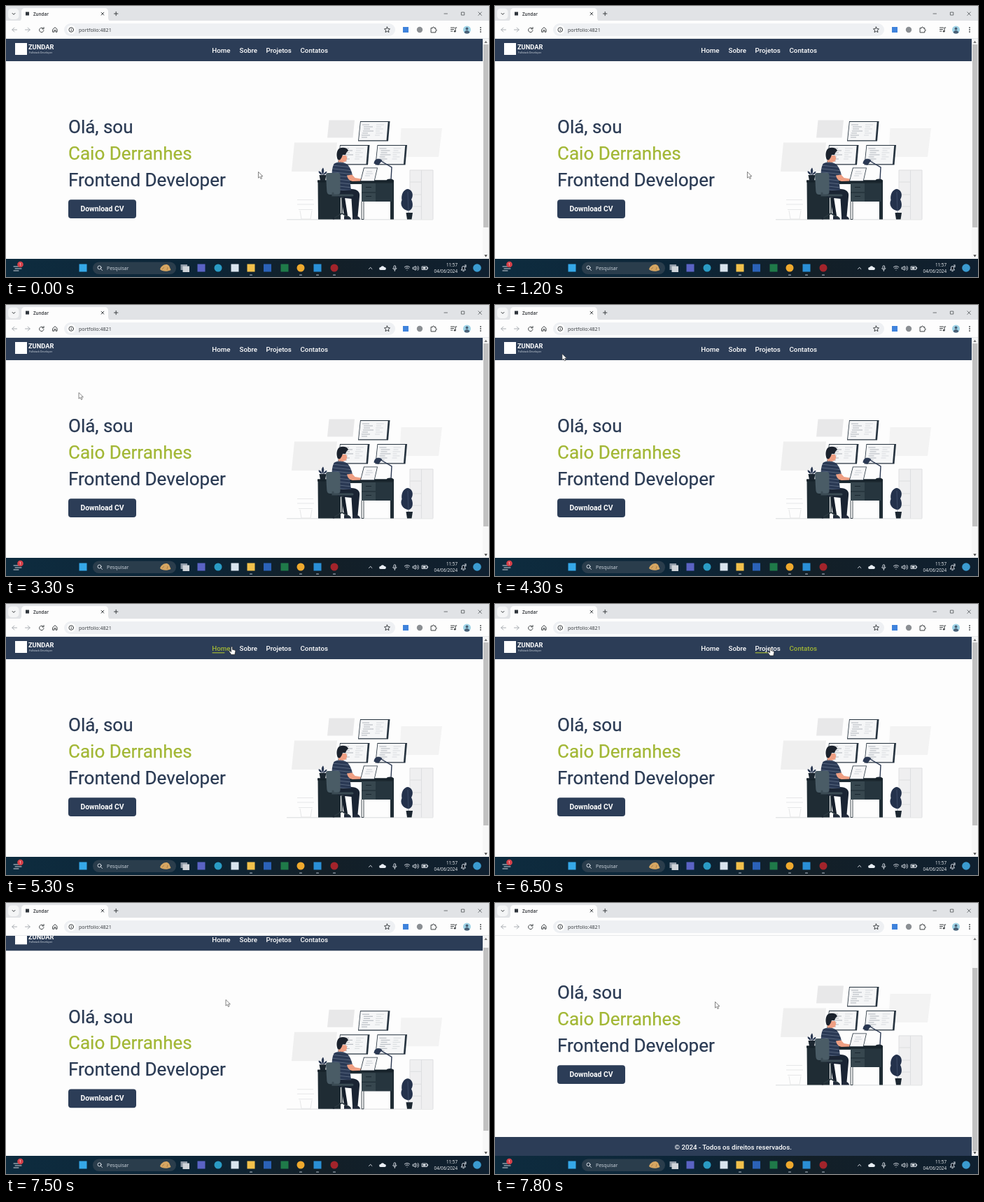
These frames come from a looping animation (690 px wide and 388 px high, 8 s). An HTML page:

```html
<!DOCTYPE html>
<html lang="pt-BR">
<head>
<meta charset="utf-8">
<title>Zundar</title>
<style>
  html, body { margin: 0; width: 100%; height: 100%; overflow: hidden; background: #fdfdfd; }
  svg { display: block; }
  .ui { font-family: "Open Sans", "Noto Sans", sans-serif; }
  .web { font-family: Roboto, sans-serif; }
  .line { fill: none; stroke: #3c4043; stroke-width: 1; stroke-linecap: round; stroke-linejoin: round; }
  .tray { fill: none; stroke: #e8edf3; stroke-width: .9; stroke-linecap: round; stroke-linejoin: round; }
</style>
</head>
<body>
<svg width="690" height="388" viewBox="0 0 690 388">
  <defs>
    <clipPath id="view"><rect y="47" width="681" height="315"/></clipPath>
    <linearGradient id="bar">
      <stop offset="0" stop-color="#0e2c3f"/>
      <stop offset=".4" stop-color="#0c2537"/>
      <stop offset=".65" stop-color="#131f27"/>
      <stop offset="1" stop-color="#0f2030"/>
    </linearGradient>
    <pattern id="stripes" width="8" height="4.8" patternUnits="userSpaceOnUse" patternTransform="rotate(6)">
      <rect width="8" height="4.8" fill="#2a3954"/>
      <rect width="8" height=".7" fill="#68768d"/>
    </pattern>
    <g id="screen">
      <path d="M3 0H45.500L43 28.500H0Z" fill="#26333f"/>
      <path d="M3.700 .9H42.700L40.500 27.300H1Z" fill="#f5f6f7"/>
      <path d="M6 5h10M8 8h13M8 11h9M7 14h15M6 17h8M5 20h12M5 23h8" stroke="#9199a2" stroke-width=".7"/>
      <path d="M26 5h11M26 8h7M25 11h11M25 14h6M25 17h10M24 20h7" stroke="#c9ced3" stroke-width=".7"/>
    </g>
  </defs>

  <rect width="690" height="388" fill="#fdfdfd"/>

  <g clip-path="url(#view)">
    <g id="page">
      <rect y="47" width="681" height="32" fill="#2c3d57"/>
      <rect x="13" y="53" width="17" height="17" fill="#fff"/>
      <g class="web" fill="#fff">
        <text x="32" y="62.300" font-size="9.250" font-weight="700">ZUNDAR</text>
        <text x="33" y="68" font-size="3.800" fill="#c9d0da">Fullstack Developer</text>
      </g>
      <g id="nav" class="web" font-size="9.750" font-weight="500"></g>

      <g class="web" font-size="26" fill="#2a3a53" stroke="#2a3a53" stroke-width=".25">
        <text x="89" y="182.300">Olá, sou</text>
        <text x="89" y="220" fill="#a2b735" stroke="#a2b735">Caio Derranhes</text>
        <text x="89" y="257.800">Frontend Developer</text>
      </g>
      <rect x="89" y="277.300" width="97" height="26.700" rx="4" fill="#2c3d57"/>
      <text class="web" x="106.500" y="294.100" font-size="10.350" font-weight="700" fill="#fff">Download CV</text>

      <g id="scene">
        <path d="M461.500 163.500H498L495.500 188.500H459Z" fill="#e8e8e9"/>
        <path d="M564.500 175H623L618 216H562Z" fill="#f3f3f3"/>
        <path d="M412 195.500H473L469 237H408Z" fill="#efefef"/>
        <path d="M401 305.800H610" stroke="#cfd2d4" stroke-width=".8"/>
        <!-- shelf -->
        <path d="M577 235H610V305.500H577Z" fill="#efeff0"/>
        <path d="M577 235V305.500M593.500 235V305.500M610 235V305.500M577 235H610M577 252H593M577 270H593M577 287H593" stroke="#dddee0" fill="none"/>
        <!-- pale shelf and pot -->
        <path d="M416 277.500H439M416 284H440M418 291.500H438M420 293l2 12h13l2-12" fill="none" stroke="#e6e7e8"/>
        <!-- screens -->
        <use href="#screen" x="503" y="165"/>
        <use href="#screen" x="474" y="199"/>
        <use href="#screen" x="527.500" y="199"/>
        <!-- desk -->
        <path d="M445.500 249.500H554V305.500H549V280H508V255H478V305.500H446Z" fill="#1f2c34"/>
        <path d="M508 254H528V280H508Z" fill="#37474f"/>
        <path d="M528 254H552V280H528Z" fill="#26353e"/>
        <path d="M508 280V305.500H511V280M508 267H528M514 259.500h8M514 272.500h8" stroke="#15212a" stroke-width=".8" fill="none"/>
        <path d="M445 249.500H554V252.500H445Z" fill="#16222a"/>
        <!-- small plant -->
        <path d="M447.500 242H457.500L456 250H449Z" fill="#1b2630"/>
        <path d="M452.500 242C450.500 238 450 234 453 231.500C455 235 454.500 239 452.500 242ZM451.500 242C448 241 446.500 239 446.500 236.500C449.500 236.500 451.500 239 451.500 242ZM453 242C454 239 456 237 458.500 237C458.500 239 456.500 241.500 453 242Z" fill="#2a3852"/>
        <!-- lamp -->
        <path d="M550 249L551 231L534 221" fill="none" stroke="#2a3852" stroke-width="1.400"/>
        <path d="M525.500 225.500C526 219 532 216.500 537.500 221L532 228Z" fill="#2a3852"/>
        <path d="M543.500 250C544 246.800 553 246.800 553.500 250Z" fill="#1b2630"/>
        <!-- worker -->
        <path d="M472 262H493C502 262 506 266 505 273L502.500 301H495L493.500 276L474 274Z" fill="#1a2433"/>
        <path d="M484 274L488 300H483L479 275Z" fill="#151e2b"/>
        <path d="M495 300.500H501C504.500 301.500 506 303.500 506 305.500H495ZM483 300.500H488.500C491.500 302 493 304 493 305.500H483Z" fill="#20293a"/>
        <path d="M475 214H486L487.300 218.500L485.500 222.500L482 223.500L482.500 227L475 226.500Z" fill="#ee9f83"/>
        <path d="M474 220C471.500 215 472 207 476 204C481 201.500 487.500 203 489 207L486.500 209.500L485 213H481L479.500 217L477 220.500Z" fill="#1b222d"/>
        <path d="M468.500 226C474 222.500 481 223 485.500 225.500C491 228.500 493.500 236 495 242L491 247L493 264H469C465 253 464 234 468.500 226Z" fill="url(#stripes)"/>
        <path d="M487 242.500L494.500 241.500L498.500 246L510.500 248L511.500 250.500L495 251C490 250 488 247 487 242.500Z" fill="#ee9f83"/>
        <!-- laptop -->
        <path d="M511 231.500H531L526.500 251H506Z" fill="#26333f"/>
        <path d="M511.700 232.300H530L525.900 250.200H507Z" fill="#f7f7f8"/>
        <path d="M515 237h8M514 240h10M513 243h7" stroke="#b9c0c7" stroke-width=".7"/>
        <!-- chair -->
        <path d="M460 239H474C477 239 477.500 241 477.500 243V266C477.500 269 476 270 473 270H463C460 270 458.500 268 458.300 265L457 242C457 240 458 239 460 239Z" fill="#4a5c66"/>
        <path d="M467 268V271H495" stroke="#3b4b54" stroke-width="3" fill="none" stroke-linecap="round"/>
        <path d="M480 272V298M468 304L480 297L492 304" stroke="#2a373f" stroke-width="1.600" fill="none"/>
        <circle cx="468" cy="304" r="1.500" fill="#1b2630"/>
        <!-- floor plant -->
        <path d="M573.500 293C566 291 562.500 284 565.500 278C564 270 568 262 574.500 262C581 264 582.500 271 579 277C582.500 284 581 291 576 293Z" fill="#24324c"/>
        <path d="M574 266L575 296" stroke="#4d5d79" stroke-width=".6"/>
        <path d="M571.500 296H581L579.500 305.500H573Z" fill="#1b2630"/>
      </g>

      <rect y="380" width="681" height="28" fill="#2c3d57"/>
      <text class="web" x="256.500" y="397.500" font-size="9.700" font-weight="500" fill="#fff">© 2024 - Todos os direitos reservados.</text>
    </g>
  </g>

  <!-- scrollbar -->
  <rect x="681" y="47" width="9" height="315" fill="#f7f7f7"/>
  <path d="M683.300 53L685.500 49.800L687.700 53Z" fill="#777"/>
  <path d="M683.300 356.300L685.500 359.500L687.700 356.300Z" fill="#444"/>
  <rect id="thumb" x="682" y="55" width="7.200" height="262" fill="#c1c1c1"/>

  <!-- browser frame -->
  <g class="ui">
    <rect width="690" height="22" fill="#e1e3e6"/>
    <rect y="21" width="690" height="26" fill="#fdfdfd"/>
    <path d="M17 22C20 22 22 20 22 17V8C22 5 24 3 27 3H141C144 3 146 5 146 8V17C146 20 148 22 151 22Z" fill="#fdfdfd"/>
    <rect x="3" y="3.500" width="15.500" height="15.500" rx="5" fill="#f4f5f6"/>
    <path class="line" d="M9 10.300l2 2l2-2M136 9.200l3.800 3.800m0-3.800l-3.800 3.800M154.500 11h5.400m-2.700-2.700v5.400"/>
    <rect x="28" y="8.500" width="5" height="5" fill="#30363d"/>
    <text x="39" y="13.600" font-size="6.300" font-weight="600" fill="#2b2e33">Zundar</text>
    <path class="line" style="stroke-width:.7" d="M626 11h4.500M650.800 9h4v4h-4zM674.800 8.800l4.600 4.600m0-4.600l-4.600 4.600"/>
    <path class="line" style="stroke:#a9adb2" d="M15.500 34H8.800m3-3l-3 3l3 3M27.500 34h6.700m-3-3l3 3l-3 3"/>
    <path class="line" d="M53.300 32.300A3.200 3.200 0 1 0 54 35M54 30.500v2.400h-2.400M67 33.300l3-2.700l3 2.700v3.900h-2v-2.500h-2v2.500h-2z"/>
    <rect x="83" y="25" width="473" height="18" rx="9" fill="#eef0f3"/>
    <circle cx="93.200" cy="34" r="6.200" fill="#fff"/>
    <circle class="line" cx="93.200" cy="34" r="3.300"/>
    <path class="line" d="M93.200 33.800v1.700M93.200 32.200v.1"/>
    <text x="104" y="36.700" font-size="7.100" fill="#33373c">portfolio:4821</text>
    <path class="line" d="M544.500 30l1.200 2.600l2.800.3l-2.100 1.900l.6 2.800l-2.500-1.400l-2.500 1.400l.6-2.800l-2.100-1.900l2.800-.3z"/>
    <rect x="567" y="30" width="8" height="8" fill="#3f83dc"/>
    <circle cx="591" cy="34" r="4.200" fill="#8b8f93"/>
    <path class="line" d="M607.500 31.500h2c-.3-2 2.400-2 2.100 0h2.200v2.200c1.900-.3 1.900 2.300 0 2v2.200h-6.300z"/>
    <path class="line" d="M635.500 31h5M635.500 33.500h4M635.500 36h2.500M642 36v-5h1.800"/>
    <circle cx="641.200" cy="36.200" r="1.300" fill="#3c4043"/>
    <circle cx="658.500" cy="34" r="5.500" fill="#9fd3e6"/>
    <path d="M654.700 38c.5-4 7-4 7.600 0c-2 2-5.600 2-7.600 0Z" fill="#4a6076"/>
    <circle cx="658.500" cy="32.500" r="1.900" fill="#4a6076"/>
    <g fill="#3c4043"><circle cx="678" cy="31" r=".9"/><circle cx="678" cy="34" r=".9"/><circle cx="678" cy="37" r=".9"/></g>
    <path d="M0 46.500H690" stroke="#e3e5e8" stroke-width=".8"/>
  </g>

  <!-- taskbar -->
  <g class="ui">
    <rect y="362" width="690" height="26" fill="url(#bar)"/>
    <path class="tray" d="M11 373h7M13 376h9M11 379h7"/>
    <circle cx="20.500" cy="370" r="4.300" fill="#d7414a"/>
    <text x="20.500" y="372.200" font-size="6" text-anchor="middle" fill="#fff">1</text>
    <rect x="124" y="366.500" width="119" height="17.500" rx="8.700" fill="#2a3d4c"/>
    <circle class="tray" cx="133.500" cy="374.500" r="2.500"/>
    <path class="tray" d="M135.500 376.500l2 2"/>
    <text x="144" y="377.700" font-size="6.900" fill="#cfd6de">Pesquisar</text>
    <path d="M220 377C221 372 229 367 233 372L235.500 378C231 380.500 223 380.500 220 377Z" fill="#d6a662"/>
    <path d="M223 377l3-3M230 378l1-4" stroke="#9c6d3a" stroke-width=".7"/>
    <path d="M249.500 370H259V378H249.500Z" fill="#8d98a5"/>
    <path d="M252.500 372.500H262V381H252.500Z" fill="#cfd4d9"/>
    <g id="apps"></g>
    <path class="tray" d="M518.500 376.500l2.200-2.200l2.200 2.200"/>
    <path d="M535 378a2 2 0 0 1 .2-4a3 3 0 0 1 5.400 0a2 2 0 0 1 .6 4Z" fill="#e8edf3"/>
    <path class="tray" d="M554 373a1.300 1.300 0 0 1 2.600 0v2a1.300 1.300 0 0 1-2.600 0zM552.700 375.500c.5 2.800 4.700 2.800 5.200 0M555.300 378v1.500"/>
    <path class="tray" d="M569.300 374c2-2 5.500-2 7.500 0M570.800 375.800c1.300-1.200 3.200-1.200 4.500 0M572.900 378h.2"/>
    <path class="tray" d="M581.500 374.200h1.500l2-1.800v6l-2-1.800h-1.500zM586.700 373.700c1 1 1 2.400 0 3.400M588.200 372.300c1.800 1.700 1.800 4.500 0 6.200"/>
    <path class="tray" d="M594.500 373h7v4.500h-7zM602.700 374.500v1.500"/>
    <path d="M595.500 374h4v2.500h-4z" fill="#e8edf3"/>
    <g font-size="6.300" text-anchor="end" fill="#f2f4f7">
      <text x="645" y="372.500">11:57</text>
      <text x="645" y="381.700">04/06/2024</text>
    </g>
    <path class="tray" d="M650.500 378h6l-1-1.500v-2a2 2 0 0 0-4 0v2zM652.800 379.700h1.400M655.500 371h2l-2 2.300h2"/>
    <circle cx="673" cy="375" r="5.800" fill="#3b9bd0"/>
  </g>

  <path id="arrow" d="M0 0V8.700L2 6.900L3.500 10L5 9.300L3.600 6.300H6.400Z" fill="#fff" stroke="#444" stroke-width=".65"/>
  <path id="hand" d="M-.9 0C-.9-1.200 1-1.200 1 0V3.200L3.600 3.800C5.200 4.200 5.500 5 5.200 6.500L4.300 10.500H-.6L-3.600 6.300C-4 5.300-2.900 4.700-2.200 5.400L-.9 6.600Z" fill="#fff" stroke="#222" stroke-width=".7"/>
</svg>
<script>
const LOOP = 8000, STEP = 100;
const NS = "http://www.w3.org/2000/svg";
const $ = id => document.getElementById(id);

function add(parent, tag, attrs, text = "") {
  const el = document.createElementNS(NS, tag);
  for (const k in attrs) el.setAttribute(k, attrs[k]);
  el.textContent = text;
  return parent.appendChild(el);
}

// taskbar apps: centre, colour, round, open
[
  [110, "#35a8e8"], [279, "#5a63c4"], [303, "#2a9bc4", 1], [327, "#d9e4ee"],
  [350, "#f2c14b", 0, 1], [373.5, "#2b62b8"], [398, "#1f7a49"],
  [421, "#efa92e", 1, 1], [445, "#2a8fd6", 0, 1], [469, "#a3242b", 1, 1]
].forEach(([x, fill, round, open]) => {
  add($("apps"), "rect", { x: x - 5.5, y: 369.5, width: 11, height: 11, rx: round ? 5.5 : 0, fill });
  if (open) add($("apps"), "rect", { x: x - 2, y: 384.5, width: 4, height: 1.3, rx: .6, fill: "#9aa5b1" });
});

// menu items with the spans during which the pointer is over them
const menu = [
  { label: "Home", x: 294.3, w: 26.5, spans: [[5100, 5400]] },
  { label: "Sobre", x: 333.5, w: 25, spans: [[5400, 5620], [6680, 6780]] },
  { label: "Projetos", x: 371.5, w: 36, spans: [[5640, 5900], [6320, 6660]] },
  { label: "Contatos", x: 420.5, w: 39, spans: [[5920, 6320]] }
];
for (const m of menu) {
  m.text = add($("nav"), "text", { x: m.x, y: 66.5 }, m.label);
  m.line = add($("nav"), "rect", { x: m.x + .3, y: 69.2, height: 1.2, fill: "#a2b735" });
}
const links = [[2200, 2650], [3800, 4150], ...menu.flatMap(m => m.spans)];

// pointer: time, x, y
const path = [
  [0, 360.5, 237.5], [1500, 360.5, 237.5], [1600, 350, 240], [1800, 275, 262],
  [2000, 205, 279], [2200, 164, 287], [2400, 156, 286], [2700, 132, 272],
  [2900, 132, 272], [3100, 116, 190], [3300, 104, 125.5], [3600, 74, 84],
  [3800, 53, 64], [3900, 56, 67], [4000, 56, 67], [4300, 96, 70],
  [4900, 280, 61], [5100, 303, 61], [5300, 322.5, 62], [5600, 358, 61],
  [5800, 394, 61], [6100, 440, 63], [6300, 420, 63], [6500, 393.5, 63.5],
  [6700, 352, 66], [6900, 328, 92], [7200, 315, 130], [7500, 314, 138.5],
  [7800, 314.5, 141.5], [8000, 314.5, 141.5]
];
const scrolls = [[0, 0], [7400, 0], [7500, 10.7], [7600, 32], [7700, 42], [7800, 45], [8000, 45]];

function at(keys, t) {
  const i = Math.max(1, keys.findIndex(k => k[0] > t));
  const a = keys[i - 1], b = keys[i];
  const p = (t - a[0]) / (b[0] - a[0]);
  return a.slice(1).map((v, n) => v + (b[n + 1] - v) * p);
}

const inside = (spans, t) => spans.find(([a, b]) => t >= a && t < b);

function update(t) {
  const [scroll] = at(scrolls, t);
  $("page").setAttribute("transform", `translate(0 ${-scroll})`);
  $("thumb").setAttribute("y", 55 + scroll * .844);

  for (const m of menu) {
    const span = inside(m.spans, t);
    const grow = span ? Math.min(1, (t - span[0]) / 300) : 0;
    m.line.setAttribute("width", m.w * grow);
    // the text colour trails the underline
    m.text.setAttribute("fill", inside(m.spans, t - 200) ? "#a2b735" : "#fff");
  }

  const [x, y] = at(path, t);
  const over = inside(links, t);
  for (const [id, on] of [["hand", over], ["arrow", !over]]) {
    $(id).setAttribute("transform", `translate(${x} ${y})`);
    $(id).setAttribute("visibility", on ? "visible" : "hidden");
  }
}

let start;
function tick(now) {
  start ??= now;
  update(Math.floor(((now - start) % LOOP) / STEP) * STEP);
  requestAnimationFrame(tick);
}
update(0);
requestAnimationFrame(tick);
</script>
</body>
</html>
```
